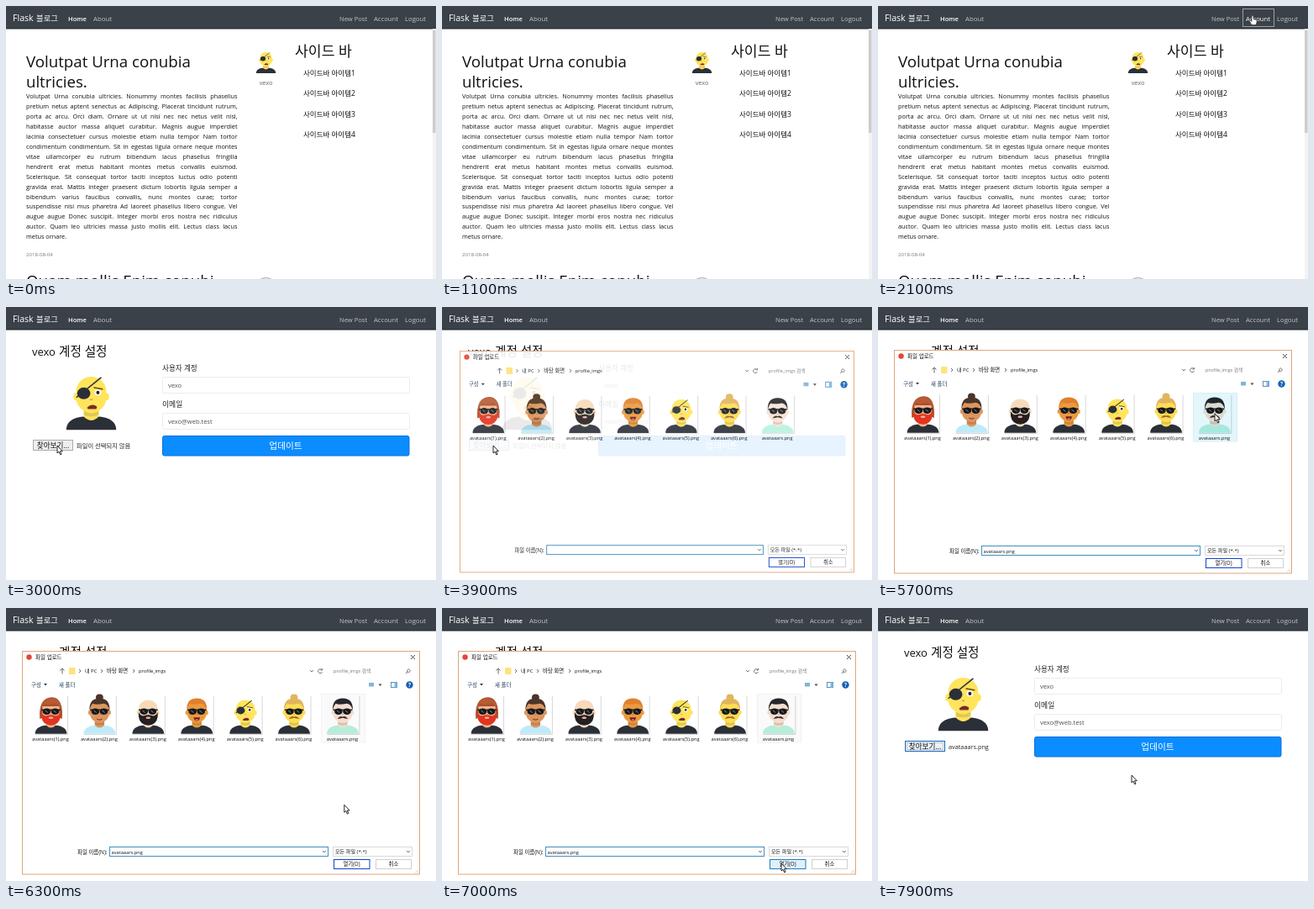
Recreate the animation shown at these times as an HTML page. Size 512 by 325 pixels, loop 8000 ms.

```html
<!DOCTYPE html>
<html lang="ko">
<head>
<meta charset="utf-8">
<title>Flask 블로그</title>
<style>
html, body { margin: 0; width: 100%; height: 100%; overflow: hidden; background: #fff; }
svg { display: block; width: 100%; height: 100%; }
text { font-family: "Open Sans", "Noto Sans CJK KR", "Noto Sans CJK", sans-serif; }
</style>
</head>
<body>
<svg id="stage" viewBox="0 0 512 325"></svg>
<script>
const MEMBER = 'vexo', MAIL = 'vexo@web.test';

const text = (x, y, size, str, fill = '#111', more = '') =>
  `<text x="${x}" y="${y}" font-size="${size}" fill="${fill}" ${more}>${str}</text>`;
const rect = (x, y, w, h, fill, stroke = 'none', more = '') =>
  `<rect x="${x}" y="${y}" width="${w}" height="${h}" fill="${fill}" stroke="${stroke}" ${more}/>`;
const path = (d, fill, stroke = 'none', width = 1) =>
  `<path d="${d}" fill="${fill}" stroke="${stroke}" stroke-width="${width}"/>`;
const oval = (x, y, rx, ry, fill) => `<ellipse cx="${x}" cy="${y}" rx="${rx}" ry="${ry}" fill="${fill}"/>`;
const line = (d, stroke, width = 1) => path(d, 'none', stroke, width);
const group = (id, ...parts) => `<g id="${id}">${parts.join('')}</g>`;
const MID = 'text-anchor="middle"', MEDIUM = 'font-weight="500"';

// Cartoon portraits, drawn in a box 60 wide (centred) and 64 high
const DARK = '#2b2f38';
const shades = oval(-8, 22, 7.5, 6, '#15181c') + oval(8, 22, 7.5, 6, '#15181c') +
  line('M-18 19H18', '#15181c', 2.5) + line('M-11 20L-6 24M5 20L10 24', '#8b9299', 1.5);
const mustache = c => path('M-10 36Q-5 29 0 32Q5 29 10 36Q4 35 0 34Q-4 35-10 36Z', c);
const mouth = path('M-6 33H6Q5 40 0 40Q-5 40-6 33Z', '#6b2224') + oval(0, 38, 3, 1.6, '#ff6a70');
const beard = c => path('M-18 23Q-14 31-8 30Q0 27 8 30Q14 31 18 23V32Q16 47 0 48Q-16 47-18 32Z', c) +
  oval(0, 34, 4.5, 2, '#f0b3a4');
const hairTop = c => path('M-19 20Q-20-3 0-3Q20-3 19 20Q16 8 8 7Q-8 10-13 7Q-17 11-19 20Z', c);
const bun = c => oval(0, -5, 7, 6, c) + hairTop(c);
const longHair = c => path('M-21 36Q-24-4 2-5Q24-4 21 36L16 34V12H-16V34Z', c);
const patch = line('M-18 25L12 1', DARK, 1.6) + oval(-9, 20, 8, 7, DARK) +
  oval(8, 19, 4, 3.6, '#fff') + oval(8, 19, 2, 2.2, '#222') +
  line('M3 13L14 15', '#7a5a18', 1.6) + path('M-5 37Q1 31 7 36L6 39H-4Z', '#7a2a28');

const people = [
  ['#f2b48c', DARK, longHair('#a9502f') + hairTop('#b85a34') + beard('#e2341f') + shades],
  ['#dc965f', '#bfeaf9', bun('#4b3428') + line('M-5 36Q0 39 5 36', '#8a3a30', 2) + shades],
  ['#f8dabb', DARK, beard('#241f20') + shades],
  ['#ea9a3f', DARK, hairTop('#e0802c') + mouth + shades],
  ['#ffe45c', DARK, patch],
  ['#ffdc55', DARK, bun('#e2b45e') + mustache('#9b6528') + shades],
  ['#f9e2d3', '#b9f2df', hairTop('#24262b') + mustache('#3a2420') + shades],
];
function portrait(i, x, y, scale) {
  const [skin, shirt, face] = people[i];
  return `<g transform="translate(${x} ${y}) scale(${scale})">` +
    path('M-30 64C-30 53-20 49-10 48H10C20 49 30 53 30 64Z', shirt) +
    path('M-9 36H9V48Q0 57-9 48Z', skin) + path('M-9 41Q0 47 9 41V46Q0 50-9 46Z', 'rgba(0,0,0,.12)') +
    oval(-18, 24, 3.5, 4.5, skin) + oval(18, 24, 3.5, 4.5, skin) +
    path('M-18 17A18 17 0 0 1 18 17V26A18 17 0 0 1-18 26Z', skin) +
    path('M-2 27Q0 30 2 27', 'rgba(150,50,20,.5)') + face + '</g>';
}

const post = `Volutpat Urna conubia ultricies. Nonummy montes facilisis phasellus
pretium netus aptent senectus ac Adipiscing. Placerat tincidunt rutrum,
porta ac arcu. Orci diam. Ornare ut ut nisi nec nec netus velit nisl,
habitasse auctor massa aliquet curabitur. Magnis augue imperdiet
lacinia consectetuer cursus molestie etiam nulla tempor Nam tortor
condimentum condimentum. Sit in egestas ligula ornare neque montes
vitae ullamcorper eu rutrum bibendum lacus phasellus fringilla
hendrerit erat metus habitant montes metus convallis euismod.
Scelerisque. Sit consequat tortor taciti inceptos luctus odio potenti
gravida erat. Mattis integer praesent dictum lobortis ligula semper a
bibendum varius faucibus convallis, nunc montes curae; tortor
suspendisse nisi mus pharetra Ad laoreet phasellus libero congue. Vel
augue augue Donec suscipit. Integer morbi eros nostra nec ridiculus
auctor. Quam leo ultricies massa justo mollis elit. Lectus class lacus
metus ornare.`.split('\n');

const pale = '#c3c6c9';
const nav = rect(0, 0, 512, 27, '#3a4148') + rect(0, 26, 512, 1.5, '#2b3137') +
  text(8, 18, 10.6, 'Flask', '#fff') + text(36, 18, 9.4, '블로그', '#fff') +
  text(74, 18, 7.6, 'Home', '#fff', 'font-weight="600"') + text(104, 18, 7.8, 'About', pale) +
  text(397, 18, 7.6, 'New Post', pale) + text(438, 18, 7.7, 'Account', pale, 'id="accountLink"') +
  text(475, 18, 7.7, 'Logout', pale);

const blog = group('blog',
  text(24, 73, 18.7, 'Volutpat Urna conubia'), text(24, 97, 18.6, 'ultricies.'),
  ...post.map((s, i) => text(24, 110 + i * 11.95, 7.3, s, '#111', 'class="post"')),
  text(24, 298, 6.1, '2018-08-04', '#777'),
  text(24, 334, 18.7, 'Quam mollis Enim conubi'),
  `<circle cx="309.5" cy="337" r="13.5" fill="#eee" stroke="#aaa"/>`,
  portrait(4, 309.5, 55, .39), text(309.5, 94, 7.3, MEMBER, '#666', MID),
  text(344, 60, 17.2, '사이드 바'),
  ...[1, 2, 3, 4].map(n => text(354, 58.5 + n * 24.4, 8.5, '사이드바 아이템' + n, '#111', MEDIUM)),
  rect(508, 27, 4, 298, '#f3f3f3'), rect(508, 29, 3.5, 122, '#cdcdcd'),
  rect(434.5, 3.5, 37, 21, 'none', '#9aa0a5', 'id="linkFocus"'));

const account = group('account',
  text(31, 58, 13, MEMBER), text(63, 58, 14.6, '계정 설정'),
  portrait(4, 101.5, 83, .99),
  rect(32.5, 158.5, 47, 12, '#eee', '#aaa', 'id="browse"'),
  rect(34.5, 160.5, 43, 8, 'none', '#666', 'id="browseFocus" stroke-width=".6" stroke-dasharray="1 1"'),
  text(56, 168, 8.6, '찾아보기...', '#111', `${MID} ${MEDIUM}`),
  text(84, 168, 7.3, '', '#222', 'id="chosen"'),
  text(186, 76, 8.6, '사용자 계정', '#222', MEDIUM), text(186, 119, 8.8, '이메일', '#222', MEDIUM),
  rect(186.5, 83.5, 294, 19, '#fff', '#ececec', 'rx="2"'),
  rect(186.5, 126.5, 294, 19, '#fff', '#ececec', 'rx="2"'),
  text(193, 95.7, 7.5, MEMBER, '#495057'), text(193, 138.7, 7.5, MAIL, '#495057'),
  rect(186.5, 153.5, 293.5, 23.5, '#0b8dff', '#0a6fdc', 'rx="2"'),
  text(333, 169, 10.7, '업데이트', '#fff', MID));

const chevron = (x, y) => line(`M${x - 2} ${y - 1}l2 2l2-2`, '#555', .8);
const crumb = x => line(`M${x - 1} 73l2 2l-2 2`, '#444', .8);
const file = (_, i) => {
  const x = 53 + i * 57.9, n = i < 6 ? `(${i + 1})` : '';
  return rect(x - 18, 105, 38, 45, '#fff') + portrait(i, x + .5, 109.4, .63) +
    line(`M${x - 18} 150.5H${x + 20.5}V105`, '#cfcfcf', .8) +
    text(x, 157.5, 5.7, `avataaars${n}.png`, '#111', MID);
};
const dialog = group('dialog',
  rect(19.5, 51.5, 473, 265.5, '#fff', '#dfa67c'),
  `<circle cx="27.5" cy="58.5" r="3.2" fill="#e2463a"/>`,
  text(35, 61, 6.5, '파일 업로드'), line('M482 56l5 5M487 56l-5 5', '#333', .9),
  line('M67 78.5V72M64.5 74.5L67 72L69.5 74.5', '#555', .9), rect(75, 71, 7.5, 8, '#ffe27a'),
  crumb(88), text(94, 77.2, 6, '내 PC'), crumb(114), text(120, 77.2, 6.4, '바탕 화면'),
  crumb(152), text(158, 77.2, 5.7, 'profile_imgs'),
  chevron(364, 75), line('M376 73.5A2.5 2.5 0 1 0 376.5 76M376.5 72V74H374.5', '#555', .8),
  text(390, 77.2, 5.7, 'profile_imgs 검색', '#777'),
  line('M476 78l2.5-2.5M481 74A1.8 1.8 0 1 1 480.9 73.8', '#666', .9),
  text(30, 93.5, 6.4, '구성', '#1d3a5c'), path('M45 90h4l-2 2.5Z', '#1d3a5c'),
  text(63, 93.5, 6.4, '새 폴더', '#1d3a5c'),
  rect(432, 89, 6, 4.5, '#7fb6d8'), path('M443.5 90.5h4l-2 2.5Z', '#444'),
  rect(458.5, 88.5, 7, 6, '#fff', '#5b8fb9'), rect(462.5, 88.5, 3, 6, '#7db9e6'),
  `<circle cx="480.5" cy="91.5" r="4.2" fill="#1660b4"/>`,
  text(480.5, 94, 6.5, '?', '#fff', MID + ' font-weight="700"'),
  people.map(file).join(''),
  rect(375.5, 102.5, 52, 57.5, '#cdeefa', '#b5e2f2', 'id="pick" style="mix-blend-mode:multiply"'),
  text(85, 292.5, 6.4, '파일 이름(N):'),
  rect(123.5, 284.5, 260, 11, '#fff', '#3f8fc0'), chevron(379, 290),
  text(125.5, 292.5, 5.7, 'avataaars.png', '#111', 'id="fileName"'),
  rect(389.5, 284.5, 94, 11, '#fff', '#d9d9d9'), text(392, 292.3, 6.1, '모든 파일 (*.*)'), chevron(479, 290),
  rect(390.5, 299.5, 42.5, 11, '#fff', '#1440c8', 'id="open"'), text(411.5, 307.3, 6.3, '열기(O)', '#111', MID),
  rect(440.5, 299.5, 42, 11, '#fff', '#cfcfcf'), text(461.5, 307.3, 6.4, '취소', '#111', MID),
  line('M487 315.5l4-4M489.5 315.5l1.5-1.5', '#bbb', .7));

const pointer = group('cursor',
  `<path id="arrow" d="M0 0V9L2 7.2L3.6 10.8L5 10.2L3.5 6.7H6.3Z" fill="#fff" stroke="#111" stroke-width=".9"/>`,
  `<path id="hand" d="M-1 1Q0-.5 1 1V4.5L5 5.5V8.5L4 11.5H-1L-3.5 7.5L-3 6L-1 7.5Z" fill="#fff" stroke="#222" stroke-width=".6"/>`);

const stage = document.getElementById('stage');
stage.innerHTML = nav + blog + account + dialog + pointer;
const $ = id => document.getElementById(id);
const show = (id, on) => { $(id).style.display = on ? '' : 'none'; };
const set = (id, attrs) => { for (const k in attrs) $(id).setAttribute(k, attrs[k]); };

// Justify all lines but the last
[...document.querySelectorAll('.post')].slice(0, -1).forEach(el => {
  const gaps = el.textContent.split(' ').length - 1;
  el.style.wordSpacing = (251.5 - el.getComputedTextLength()) / gaps + 'px';
});

const LOOP = 8000, STEP = 100;
const route = [[1300, 462, -16], [1900, 446, 11], [2250, 446, 11], [3000, 61, 165], [4050, 61, 165],
  [4700, 280, 195], [5000, 280, 195], [5450, 401, 127], [5900, 401, 127], [6600, 404, 304],
  [7350, 404, 304], [7850, 302, 199]];
const clamp = v => Math.max(0, Math.min(1, v));
function cursorAt(t) {
  if (t >= route.at(-1)[0]) return route.at(-1).slice(1);
  const i = Math.max(1, route.findIndex(k => k[0] > t));
  const [t0, x0, y0] = route[i - 1], [t1, x1, y1] = route[i];
  const p = clamp((t - t0) / (t1 - t0)), e = p * p * (3 - 2 * p);
  return [x0 + (x1 - x0) * e, y0 + (y1 - y0) * e];
}

function draw(t) {
  const [x, y] = cursorAt(t), onBlog = t < 2200, onLink = y < 25 && x > 434 && x < 472;
  set('cursor', { transform: `translate(${x.toFixed(1)} ${y.toFixed(1)})` });
  show('hand', onLink);
  show('arrow', !onLink);
  set('accountLink', { fill: onLink && y > 0 ? '#fff' : pale });

  show('blog', onBlog);
  show('account', !onBlog);
  show('linkFocus', t >= 2000);
  const focused = t >= 3600;
  set('browse', { stroke: focused ? '#1a66b8' : '#aaa', fill: focused ? '#e9f3fb' : '#eee' });
  show('browseFocus', focused);
  $('chosen').textContent = t < 7300 ? '파일이 선택되지 않음' : 'avataaars.png';

  const open = clamp(t < 5000 ? (t - 3630) / 300 : (7500 - t) / 200), scale = .915 + .085 * open;
  show('dialog', open > 0);
  set('dialog', { opacity: open, transform: `translate(256 184) scale(${scale}) translate(-256 -184)` });
  const overFile = x > 375 && x < 428 && y > 102 && y < 160, picked = t >= 5500;
  show('pick', overFile || picked);
  set('pick', overFile ? { fill: '#e2f6fc', stroke: '#d5f0f8' } : { fill: '#fafafa', stroke: '#f1f1f1' });
  show('fileName', picked);
  const overOpen = y > 299 && x > 390;
  set('open', { fill: overOpen ? '#e0f0fb' : '#fff', stroke: overOpen ? '#1a7fc4' : '#1440c8' });
}

const start = performance.now();
function tick() {
  const t = (performance.now() - start) % LOOP;
  draw(Math.floor(t / STEP) * STEP);
  requestAnimationFrame(tick);
}
tick();
</script>
</body>
</html>
```
